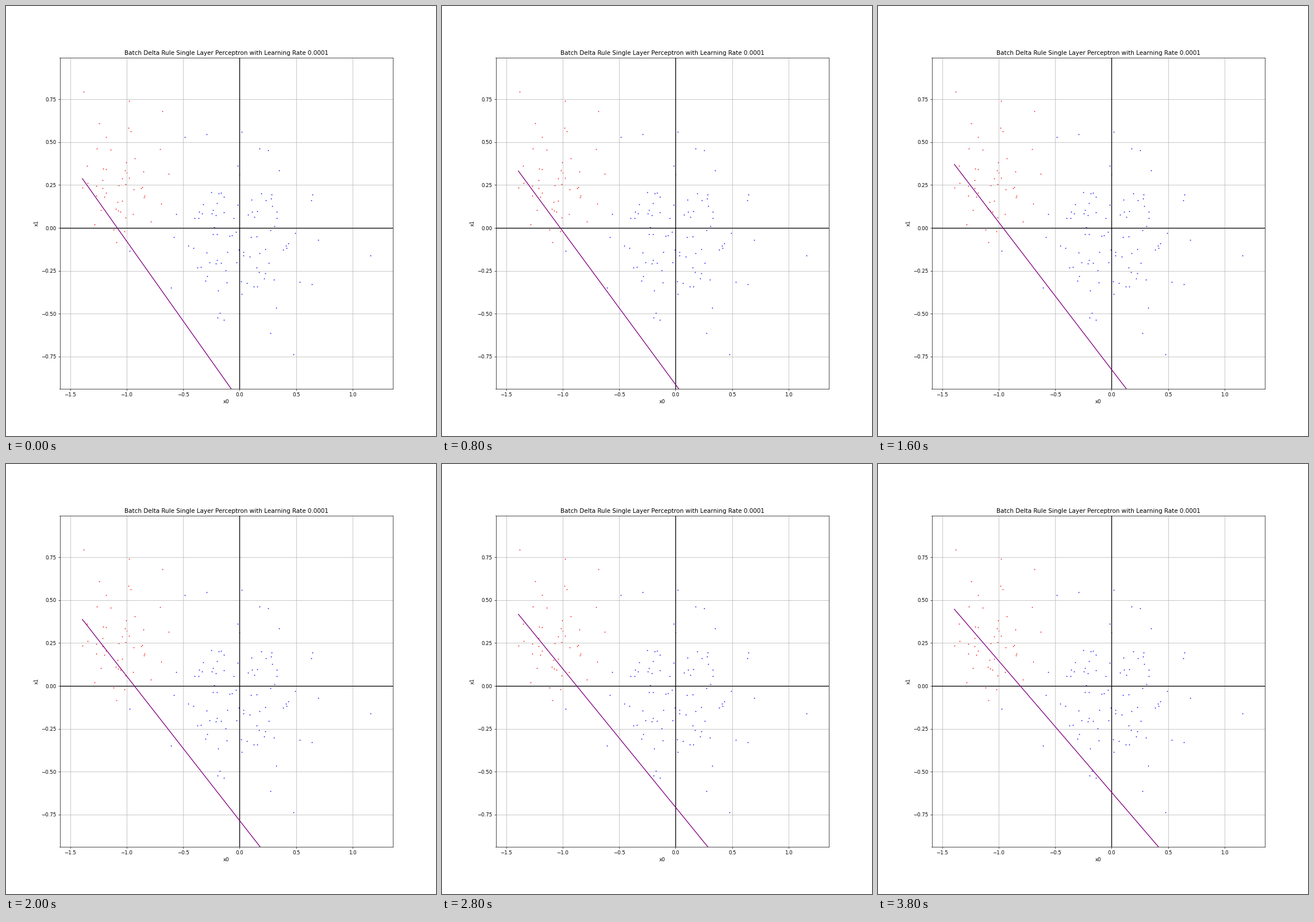
These frames come from a looping animation (748 px wide and 748 px high, 4 s). A matplotlib script:

```python
import numpy as np
import matplotlib.pyplot as plt
from matplotlib.animation import FuncAnimation

STAGE = 748
FRAMES = 20
XLIM = (-1.592, 1.357)
YLIM = (-0.9375, 0.9932)
X_START = -1.392

# Outlying samples on the stage, as x, y pairs in pixels
RED = [
    134.5, 149.5, 214, 165.5, 272, 183.5, 162, 204, 212.5, 212.5,
    216.5, 218.5, 174, 228.5, 157.5, 248, 267.5, 249, 181.5, 250,
    223.5, 265, 282.5, 292.5, 140.5, 278.5, 142, 308, 132.8, 315.7,
    269.5, 344.5, 251.5, 375.5, 154, 380, 186.5, 389, 205.5, 392.5,
    192, 411, 165, 355.5,
]
BLUE = [
    311, 228.5, 348.5, 223, 410.5, 219.5, 441, 248, 456.5, 251.5,
    403, 278.5, 475, 286, 533, 328, 531.5, 338.5, 343, 345,
    296, 362.5, 503, 395.5, 291.5, 402.5, 543.5, 407, 491.5, 413.5,
    317, 417.5, 215, 425.5, 634, 433.5, 333, 455, 287, 489.5,
    511, 480, 532.5, 483.5, 470.5, 524.5, 372, 534, 368, 542,
    378.5, 545.5, 460, 569, 500, 606,
]

rng = np.random.default_rng(7)


def cluster(outliers, count, center, radii):
    """Join the outliers with a seeded core spread evenly over an ellipse."""
    angle = rng.uniform(0, 2 * np.pi, count)
    reach = np.sqrt((np.arange(count) + 0.5) / count)
    unit = np.column_stack([np.cos(angle), np.sin(angle)])
    core = center + radii * unit * reach[:, None]
    return np.vstack([np.reshape(outliers, (-1, 2)), core])


def to_data(px):
    """Turn stage pixels into data coordinates."""
    x, y = px.T
    return (x - 406.45) / 196.6, (386.05 - y) / 298.3


def boundary(i):
    """Decision line after step i, from its left end to the right limit."""
    y_start = 0.2878 + 0.01183 * i - 0.000181 * i**2
    x_floor = -0.0755 + 0.02543 * i + 0.000015 * i**2
    slope = (YLIM[0] - y_start) / (x_floor - X_START)
    x = np.array([X_START, XLIM[1]])
    return x, y_start + slope * (x - X_START)


red = cluster(RED, 28, np.array([200, 318]), np.array([45, 60]))
blue = cluster(BLUE, 72, np.array([405, 400]), np.array([85, 110]))

plt.rcParams["font.family"] = "DejaVu Sans"
fig, ax = plt.subplots(figsize=(12, 12), dpi=STAGE / 12)
ax.set(xlim=XLIM, ylim=YLIM, xlabel="x0", ylabel="x1",
       xticks=np.arange(-1.5, 1.1, 0.5), yticks=np.arange(-0.75, 0.8, 0.25))
ax.set_title("Batch Delta Rule Single Layer Perceptron with Learning Rate 0.0001")
ax.grid(True)
ax.axhline(0, color="black")
ax.axvline(0, color="black")
ax.scatter(*to_data(red), s=1, color="red")
ax.scatter(*to_data(blue), s=1, color="blue")
line, = ax.plot(*boundary(0), color="purple")


def update(i):
    line.set_data(*boundary(i))
    return line,


anim = FuncAnimation(fig, update, frames=FRAMES, interval=200,
                     repeat=True, repeat_delay=0)
plt.show()
```
